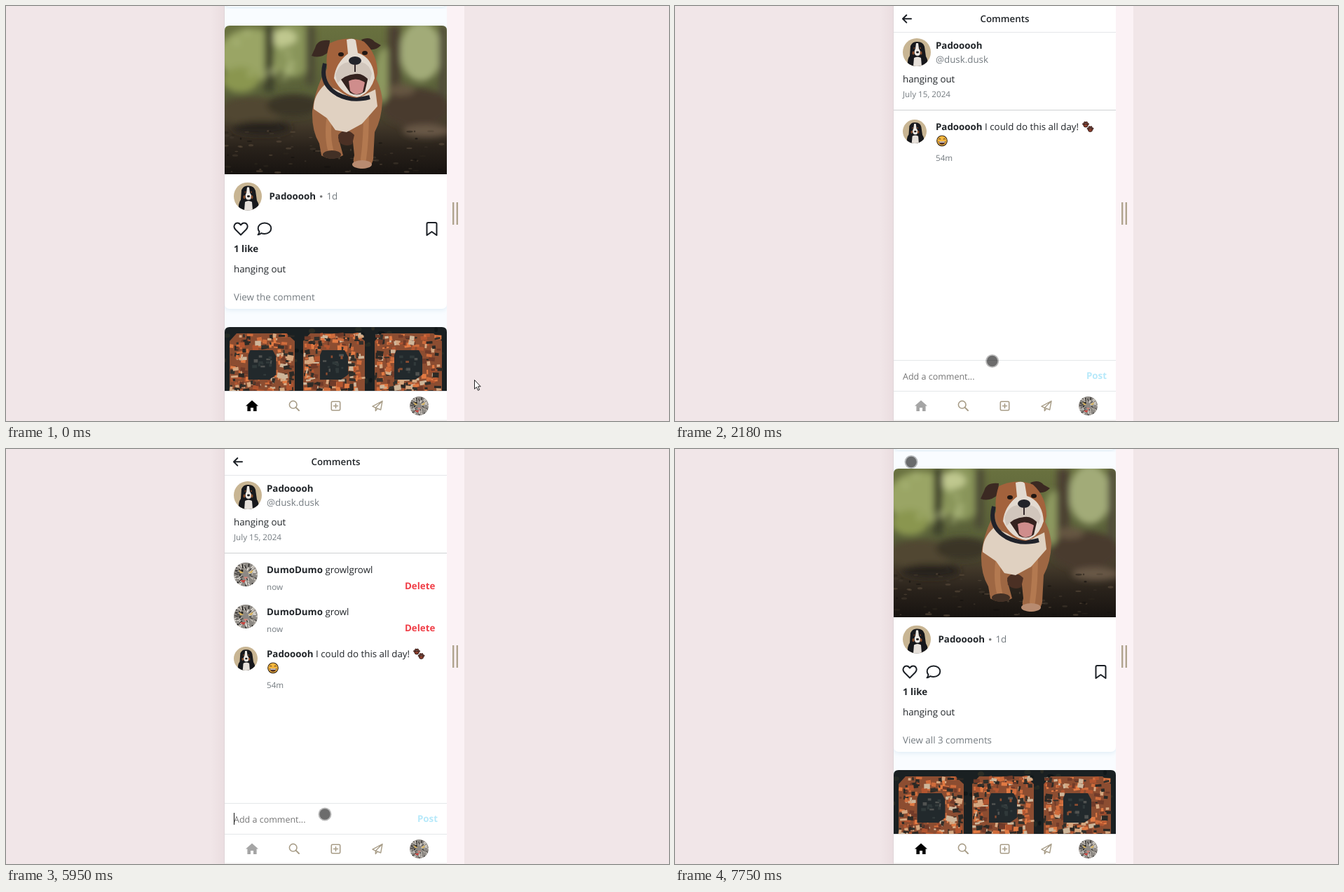
An HTML page for the animation above (8 s loop, 946x592 px).

```html
<!DOCTYPE html>
<html lang="en">
<head>
<meta charset="utf-8">
<title>Comments</title>
<style>
html, body { margin: 0; width: 100%; height: 100%; overflow: hidden; background: #f1e6e8; }
svg { display: block; }
text { font: 13.33px "Open Sans", "Noto Sans", sans-serif; fill: #212529; text-rendering: geometricPrecision; }
.b { font-weight: 700; }
.s { font-size: 11.67px; }
.in { font-size: 12.5px; }
.g { fill: #747b80; }
.del { fill: #f03e47; font-weight: 700; }
.line { fill: none; stroke: #1c2026; stroke-width: 2; stroke-linejoin: round; stroke-linecap: round; }
.tan { fill: none; stroke: #a89d88; stroke-width: 1.6; stroke-linejoin: round; stroke-linecap: round; }
</style>
</head>
<body>
<svg id="stage" width="946" height="592" viewBox="0 0 946 592"></svg>
<script>
const USER = 'Padooooh', HANDLE = '@dusk.dusk', ME = 'DumoDumo';
const LOOP = 8000;

let seed = 7;
const rnd = (a = 0, b = 1) => {
  seed = (seed * 16807) % 2147483647;
  return a + (b - a) * seed / 2147483647;
};
const pick = list => list[Math.floor(rnd(0, list.length))];
const repeat = (n, f) => Array.from({ length: n }, (_, i) => f(i)).join('');
const text = (x, y, s, cls = '', more = '') => `<text x="${x}" y="${y}" class="${cls}" ${more}>${s}</text>`;
const rect = (x, y, w, h, fill, more = '') => `<rect x="${x}" y="${y}" width="${w}" height="${h}" fill="${fill}" ${more}/>`;
const oval = (x, y, rx, ry, fill, more = '') => `<ellipse cx="${x}" cy="${y}" rx="${rx}" ry="${ry}" fill="${fill}" ${more}/>`;
const shape = (d, fill, more = '') => `<path d="${d}" fill="${fill}" ${more}/>`;
const pic = (id, x, y, r) => `<use href="#${id}" transform="translate(${x} ${y}) scale(${r / 20})"/>`;

// Avatars, drawn in a circle of radius 20
const dogFace = () => `<g id="dog" clip-path="url(#round)">
  ${rect(-20, -20, 40, 40, '#c8b593')}
  ${shape('M-9-9Q-6-16 1-15Q9-15 11-8L13 6Q17 12 15 20H-13Q-14 10-10 5Z', '#17181c')}
  ${shape('M-1-13L2-13L3-5Q7 0 4 4Q1 6-2 4Q-5 0-2-5Z', '#eee9e3')}
  ${shape('M-4 8Q1 5 6 8L7 20H-5Z', '#e6e0da')}
  ${oval(-5, 1, 1.5, 2.5, '#8b4e2c')}${oval(6, 1, 1.5, 2.5, '#8b4e2c')}
  ${oval(1, 0, 2, 1.4, '#17181c')}${oval(-3.5, -6, 1, 1, '#8b4e2c')}${oval(5, -6, 1, 1, '#8b4e2c')}
</g>`;

const catFace = () => `<g id="cat" clip-path="url(#round)">
  ${rect(-20, -20, 40, 40, '#8d8984')}
  ${repeat(75, () => {
    const a = rnd(0, 6.28), r = rnd(5, 19), l = rnd(3, 7), w = rnd(-.4, .4);
    const x = Math.cos(a) * r, y = Math.sin(a) * r;
    return `<path d="M${x} ${y}l${Math.cos(a + w) * l} ${Math.sin(a + w) * l}" stroke="${pick(['#171615', '#2b2927', '#e9e5df', '#c8c2ba'])}" stroke-width="${rnd(1, 2.3)}"/>`;
  })}
  ${shape('M-12-8L-3-3L-9-2Z', '#d8b35c')}${shape('M13-8L4-3L10-2Z', '#d8b35c')}
  ${shape('M-4 4H4L0 8Z', '#d9857a')}${shape('M-10 10L0 9L-3 14Z', '#c9433d')}
</g>`;

const dogPhoto = () => `<g clip-path="url(#photo)">
  ${rect(312, 28, 317, 212, 'url(#wood)')}
  <g filter="url(#blur)">
    ${oval(350, 70, 46, 38, '#9aa565')}${oval(410, 62, 28, 40, '#89955a')}${oval(592, 65, 30, 42, '#a2ab78')}
    ${oval(540, 100, 14, 40, '#8e9a60')}${oval(395, 45, 20, 12, '#c0c88f')}${oval(335, 105, 26, 18, '#8a964f')}
    ${rect(369, 28, 13, 95, '#3e3f2a')}${rect(428, 28, 13, 85, '#4e4c34')}${rect(545, 28, 18, 105, '#4c4032')}${rect(618, 28, 11, 110, '#50493a')}
    ${oval(350, 150, 45, 20, '#514632')}${oval(410, 142, 38, 16, '#3b3427')}${oval(585, 145, 48, 28, '#493b2d')}
    ${oval(563, 120, 20, 8, '#665743')}${oval(600, 178, 34, 9, '#695947')}${oval(365, 174, 42, 10, '#28231c')}
    ${repeat(16, () => oval(rnd(325, 420), rnd(36, 105), 4, 4, '#bcc78b', 'opacity=".5"'))}
  </g>
  ${repeat(90, () => oval(rnd(312, 629), rnd(178, 240), rnd(1, 5), rnd(.6, 1.8), pick(['#40372c', '#15120f', '#554838', '#2b251d']), 'opacity=".65"'))}
  ${shape('M460 86Q442 112 437 150Q436 178 447 196L450 213Q464 222 481 213L474 187Q484 175 494 184L497 213Q492 229 506 232Q522 232 524 218L526 180Q536 162 537 135Q535 110 520 92Z', '#9e6743')}
  ${shape('M463 150Q457 181 463 205M514 150Q514 190 510 218', 'none', 'stroke="#bd8056" stroke-width="8" stroke-linecap="round" opacity=".7"')}
  ${shape('M474 184Q484 171 497 184L494 197Q484 202 475 194Z', '#4b3024')}
  ${oval(465, 212, 13, 6, '#423025')}${oval(508, 226, 14, 6, '#b88b70')}
  ${shape('M455 112Q438 128 439 147L458 160L470 177L486 180L508 168L530 143L527 119L500 132Z', '#e0d1c1')}
  ${shape('M455 82Q447 111 473 126Q494 137 519 130', 'none', 'stroke="#20222a" stroke-width="6"')}
  ${shape('M462 49Q444 47 441 60L436 71Q449 76 461 65ZM507 48Q519 43 526 51L535 56Q525 66 514 60Z', '#3b2922')}
  ${shape('M462 53Q487 41 511 51Q530 68 530 96Q524 127 500 131Q473 128 460 101Q454 75 462 53Z', '#a3623c')}
  ${shape('M486 48Q496 45 499 49L502 67Q524 74 526 103Q519 126 501 130Q479 127 468 103Q470 82 488 68Z', '#e3dad0')}
  ${shape('M474 99Q490 88 497 92Q510 90 517 101L512 122Q503 130 491 124Z', '#34221f')}
  ${shape('M489 107Q500 101 512 109L509 123Q499 130 491 121Z', '#cf8d8c')}
  ${shape('M470 98Q477 77 496 81Q516 76 522 96L519 107Q509 95 498 97Q483 98 473 110Z', '#d1c6bc')}
  ${oval(498, 78, 9, 6, '#22232a')}${shape('M498 83V94', 'none', 'stroke="#33282a" stroke-width="2"')}
  ${oval(478, 69, 4, 3, '#211713')}${oval(512, 67, 4, 3, '#211713')}
</g>`;

const cityPhoto = () => `<g clip-path="url(#city)">
  ${rect(312, 458, 317, 110, '#1a2022')}
  ${repeat(70, () => oval(rnd(312, 629), rnd(458, 549), rnd(2, 5), rnd(2, 4), pick(['#242a25', '#2c2d25', '#101719'])))}
  ${[[319, 412], [424, 512], [526, 622]].map(([l, r]) => {
    const m = (l + r) / 2;
    return `${shape(`M${l + 10} 467H${r - 12}L${r} 478V560H${l}V478Z`, '#8c4d31')}
    ${repeat(230, () => {
      const x = rnd(l, r - 7), y = rnd(467, 550);
      if (Math.abs(x + 3 - m) < 20 && Math.abs(y + 2 - 510) < 22) return '';
      return rect(x, y, rnd(2, 10), rnd(2, 8), pick(['#cf6c3c', '#e17a43', '#b25530', '#d5a780', '#713b29', '#33302b', '#2c2925', '#ceb69a']), `transform="rotate(${rnd(-12, 12)} ${x} ${y})"`);
    })}
    ${shape(`M${m - 17} 491H${m + 15}L${m + 20} 500V526L${m + 10} 533H${m - 20}V498Z`, '#22292c')}
    ${repeat(14, () => rect(m + rnd(-16, 12), rnd(496, 526), rnd(2, 7), rnd(2, 5), pick(['#515351', '#30393a', '#8c4d31'])))}`;
  }).join('')}
</g>`;

const feed = () => `<g id="feed">
  ${rect(312, 0, 317, 549, '#f9fcff')}
  ${rect(312, -20, 317, 21, '#fff', 'rx="7" filter="url(#soft)"')}
  ${rect(312, 28, 317, 404, '#fff', 'rx="7" filter="url(#soft)"')}
  ${dogPhoto()}${cityPhoto()}
  ${pic('dog', 345, 271.5, 20)}
  ${text(375.5, 276, USER, 'b')}${oval(449.7, 271.7, 1.8, 1.8, '#777')}${text(457.5, 276, '1d', 'g')}
  <g class="line">
    <path d="M335 326.5L327.5 319C323 314 327 309.5 330.5 309.5C333 309.5 335 312.5 335 312.5C335 312.5 337 309.5 339.7 309.5C343.5 309.5 347 314 342.5 319Z"/>
    <path d="M369 309.5C374.5 309.5 378.3 313 378.3 317.3C378.3 321.6 374.3 325 369 325Q366.5 325 364.3 324.1Q362 326.2 359.5 326.3Q361.3 324.3 361.5 322Q359.7 320 359.7 317.3C359.7 313 363.5 309.5 369 309.5Z"/>
    <path d="M600.5 327V311Q600.5 309 602.5 309H612.5Q614.5 309 614.5 311V327L607.5 322Z"/>
  </g>
  ${text(325, 351, '1 like', 'b')}${text(325, 379.7, 'hanging out')}
  ${text(325, 419.7, '', 'g', 'id="view"')}
</g>`;

const paw = (x, y) => `<g transform="translate(${x} ${y})" fill="#8c3f2d" stroke="#2c1917" stroke-width=".9">
  <ellipse cy="1.5" rx="3" ry="2.4"/><circle cx="-3.2" cy="-.6" r="1.2"/><circle cx="-1.2" cy="-2.7" r="1.2"/><circle cx="1.3" cy="-2.7" r="1.2"/><circle cx="3.3" cy="-.6" r="1.2"/>
</g>`;

const smile = `<circle cx="381" cy="192.3" r="7.3" fill="#f8b73d" stroke="#3c2b19" stroke-width="1.2"/>
  <path d="M376.2 190.3q1.5-2.2 3 0M382.8 190.3q1.5-2.2 3 0" fill="none" stroke="#3c2b19"/>
  <path d="M376 193H386Q385 197.8 381 197.8T376 193Z" fill="#503026"/><path d="M377 193.4H385V194.7H377Z" fill="#fff"/>`;

const mine = (id, words) => `<g id="${id}">${pic('cat', 342, 179, 17)}
  <text x="372" y="176.8"><tspan class="b">${ME}</tspan> ${words}</text>
  ${text(372, 201, 'now', 's g')}${text(569, 200, 'Delete', 'del')}</g>`;

const post = () => `<g id="post">
  <path d="M337 18.3H325.5M330.3 13L325 18.3L330.3 23.6" class="line"/>
  ${text(470.5, 23, 'Comments', '', 'text-anchor="middle" font-weight="600" style="font-weight:600"')}
  ${rect(312, 37, 317, 1, '#e4e7e9')}
  ${pic('dog', 345, 66, 20)}${text(372, 60.8, USER, 'b')}${text(372, 80.8, HANDLE, 'g')}
  ${text(325, 109, 'hanging out')}${text(325, 130, 'July 15, 2024', 's g')}
  ${rect(312, 148, 317, 1, '#cfd1d3')}
  ${mine('second', 'growlgrowl')}${mine('first', 'growl')}
  <g id="old">${pic('dog', 342, 179, 17)}
    <text x="372" y="176.8"><tspan class="b">${USER}</tspan> I could do this all day!</text>
    ${paw(586, 169)}${paw(592.5, 175.5)}${smile}${text(372, 221, '54m', 's g')}</g>
  ${rect(312, 505, 317, 1, '#e4e7e9')}
  ${text(325, 532.5, '', 'in', 'id="field"')}${text(587, 532.3, 'Post', 'b', 'id="send"')}
  ${rect(0, 519, 1, 17, '#111', 'id="caret"')}
</g>`;

const nav = () => `${rect(312, 549, 317, 41.5, '#fff')}${rect(312, 549, 317, 1, '#e4e7e9')}${rect(312, 590.5, 317, 1.5, '#efecec')}
  <path id="home" d="M351 562.5L360 570.5H357.6V578H353V573H349V578H344.4V570.5H342Z" stroke-linejoin="round"/>
  <g class="tan"><circle cx="409.7" cy="568.7" r="5.3"/><path d="M413.6 572.6L418 577" stroke-width="2"/>
  <rect x="464.3" y="564.3" width="12.4" height="12.4" rx="1.5"/><path d="M470.5 567.5V573.5M467.5 570.5H473.5"/>
  <path d="M537 563.5L523 571.2L527.3 573.2L534.7 576ZM537 563.5L527.3 573.2V577.5L530 574.3" stroke-width="1.4"/></g>
  ${pic('cat', 589.5, 570.5, 13.5)}`;

const $ = id => document.getElementById(id);
$('stage').innerHTML = `<defs>
  <clipPath id="round"><circle r="20"/></clipPath>
  <clipPath id="photo"><path d="M312 240V35Q312 28 319 28H622Q629 28 629 35V240Z"/></clipPath>
  <clipPath id="city"><path d="M312 549V465Q312 458 319 458H622Q629 458 629 465V549Z"/></clipPath>
  <clipPath id="screen"><rect x="312" width="317" height="592"/></clipPath>
  <filter id="blur"><feGaussianBlur stdDeviation="5"/></filter>
  <filter id="soft"><feDropShadow dx="0" dy="2" stdDeviation="3" flood-color="#a8cbe0" flood-opacity=".3"/></filter>
  <linearGradient id="wood" x2="0" y2="1"><stop stop-color="#69713f"/><stop offset=".45" stop-color="#596039"/><stop offset=".68" stop-color="#413729"/><stop offset=".82" stop-color="#29221b"/><stop offset="1" stop-color="#171310"/></linearGradient>
  <linearGradient id="shade"><stop stop-color="#eadde0" stop-opacity="0"/><stop offset="1" stop-color="#eadde0"/></linearGradient>
  ${dogFace()}${catFace()}
</defs>
${rect(292, 0, 20, 592, 'url(#shade)')}${rect(629, 0, 25, 592, '#fbf2f5')}
${rect(637, 280, 2.4, 32, '#b0a48e')}${rect(642.6, 280, 2.4, 32, '#b0a48e')}
<g clip-path="url(#screen)">${rect(312, 0, 317, 592, '#fff')}${feed()}${post()}${nav()}</g>
${rect(311, 0, 1, 592, '#dfd6d9')}
<path id="arrow" d="M.5.5V13.3L3.4 10.6L5.5 15.3L7.6 14.4L5.5 9.8H9.2Z" fill="#fff" stroke="#222"/>
<g id="touch"><circle r="9.5" opacity=".27"/><circle r="7.7" opacity=".42"/></g>`;

// start, end, easing power, then from / control / to points
const moves = [
  [20, 670, 2, 668, 533, 540, 450, 437, 413],
  [1740, 2470, 2.2, 437, 413, 446, 465, 455, 521],
  [6440, 7190, 2, 455, 521, 275, 150, 337, 18.5]
];

function pointer(t) {
  const [a, b, pow, x0, y0, x1, y1, x2, y2] = moves.filter((m, i) => !i || t >= m[0]).pop();
  const u = Math.min(1, Math.max(0, (t - a) / (b - a)));
  const p = 1 - (1 - u) ** pow, q = 1 - p;
  return [q * q * x0 + 2 * p * q * x1 + p * p * x2, q * q * y0 + 2 * p * q * y1 + p * p * y2];
}

const within = (t, ...spans) => spans.some(([a, b]) => t >= a && t < b);
const show = (id, on) => $(id).setAttribute('display', on ? 'inline' : 'none');
const move = (id, x, y) => $(id).setAttribute('transform', `translate(${x} ${y})`);

function draw(t) {
  const [x, y] = pointer(t), touch = x < 629;
  show('arrow', !touch);
  show('touch', touch);
  move(touch ? 'touch' : 'arrow', x, y);

  show('feed', t < 1140 || t >= 7640);
  show('post', within(t, [1430, 7540]));
  $('view').textContent = t < 4000 ? 'View the comment' : 'View all 3 comments';
  const dim = within(t, [1140, 7540]) ? Math.min(1, (t - 1140) / 130) : 0;
  const grey = Math.round(165 * dim);
  $('home').setAttribute('fill', `rgb(${grey},${grey},${grey})`);

  const count = (t >= 3820) + (t >= 5490);
  show('first', count > 0);
  show('second', count > 1);
  move('first', 0, (count - 1) * 60);
  move('old', 0, count * 60);

  const words = within(t, [3320, 3760], [4830, 4980]) ? 1 : within(t, [4980, 5430]) ? 2 : 0;
  $('field').textContent = words ? 'growl'.repeat(words) : 'Add a comment...';
  $('field').style.fill = words ? '#212529' : '#757575';
  $('send').style.fill = words ? '#0dcaf0' : '#b7e9fa';
  show('caret', within(t, [2550, 3030], [3320, 3820], [4310, 4800], [4830, 5460], [5950, 6440]));
  $('caret').setAttribute('x', 325 + words * 32.4);
}

const start = performance.now();
(function tick() {
  draw((performance.now() - start) % LOOP);
  requestAnimationFrame(tick);
})();
</script>
</body>
</html>
```
